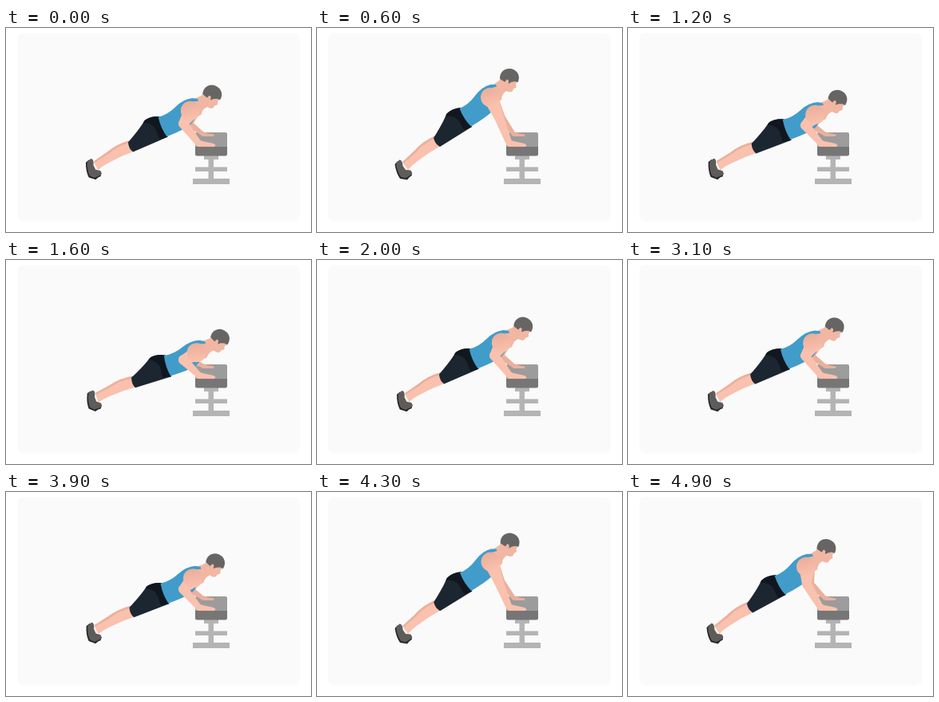
Animation, 382 px wide and 256 px high, one loop 5000 ms. Source, as an HTML page:

```html
<!DOCTYPE html>
<html lang="en">
<head>
<meta charset="utf-8">
<title>Incline push-up</title>
<style>
  html, body { margin: 0; width: 100%; height: 100%; overflow: hidden; background: #fff; }
  svg { display: block; width: 382px; height: 256px; }
  .skin { fill: #f9c1ae; }
  .face { fill: #f1b7a3; }
  .shade { fill: #eab09c; }
</style>
</head>
<body>
<svg viewBox="0 0 382 256">
  <defs>
    <linearGradient id="tone" x1=".2" y1="0" x2=".6" y2="1">
      <stop offset="0" stop-color="#e9ad99"/>
      <stop offset="1" stop-color="#f9c1ae"/>
    </linearGradient>
  </defs>

  <rect x="14" y="6.500" width="354" height="236" rx="8" fill="#fafafa"/>

  <g id="bench">
    <path fill="#b4b4b4" d="M248 160h18v5h-6v9.500h17v5.500h-17v9h20v7h-46v-7h19.500v-9H237v-5.500h16.500V165H248z"/>
    <path fill="#9c9c9c" d="M239 131h36q2 0 2 2v17h-40v-17q0-2 2-2z"/>
    <path fill="#777676" d="M237 149h40v9.500q0 2-2 2h-36q-2 0-2-2z"/>
  </g>

  <g class="shade">
    <path id="farUpper"/>
    <path id="farFore"/>
    <path d="M243 130.500Q248 129.500 252 132L260 133.500Q262 135 259 136L247 136Q243 135 243 130.500Z"/>
  </g>

  <g class="body">
    <g id="leg">
      <path class="shade" d="M148 135Q131 143 122 154L107 168L113 175L150 146Z"/>
      <path class="skin" d="M147 139Q133 145 124 156L108 170L114 178Q119 172 126 167Q140 156 155 148Z"/>
    </g>
    <g id="shoe">
      <path fill="#252525" d="M97.500 171L101 167L108 184L119 181L118.500 185.500L116 187L113 190.500L104 189Q99 182 97.500 171Z"/>
      <path fill="#5d5c5a" d="M99 170L103 165.500Q107 165 107.500 173L111 178L117 178.500Q120 181 118 184L111 188.500L105 187Q100 180 99 170Z"/>
    </g>
    <path fill="#1c2631" d="M180 100Q169 101 162 108Q159 117 146 138Q148 146 154 149L194 124Z"/>
    <path fill="#10171f" d="M180 100Q169 101 163 107L161 111Q172 109 178 117L184 128L194 124Z"/>
    <path class="face" d="M212 74Q225 70 230 64L240 78Q232 80 231 90L222 96Z"/>
    <g id="head" transform="rotate(15 241 62)">
      <path class="face" d="M231 63L249 60L252.500 63L251 68L252.500 72L250 74L249 78Q246 81 241 79L235 79Z"/>
      <path fill="#666564" d="M230 67C227 58 233 51 241 51C249 51 254 57 253 65L249 65L245 67L242 70L241 66L238.500 65L237 69Z"/>
    </g>
    <path fill="#429cc9" d="M178.500 101Q190 96 198 85Q206 74 217 71L224 71L225 73.500L216 76Q230 92 219 105Q212 112 193 123.500Q184 115 178.500 101Z"/>
  </g>

  <g id="nearArm">
    <path id="upper" class="skin"/>
    <path id="fore" class="skin"/>
    <circle class="body" cx="217" cy="87" r="12" fill="url(#tone)"/>
    <path class="skin" d="M236 141Q241 139 246 142L260 145Q264 147 261 149L241 149Q236 148 236 141Z"/>
  </g>
</svg>

<script>
  const LOOP = 5000, STEP = 100;
  // One push-up: a half sine down and up, then a rest at the top
  const PERIOD = 2000, MOVE = 1530, FIRST = 780, DEPTH = 14.7;
  const TOE = [114, 186];
  const el = id => document.getElementById(id);
  const bodyParts = document.querySelectorAll(".body");

  function leanAt(time) {
    const phase = (time - FIRST + PERIOD) % PERIOD;
    return phase < MOVE ? DEPTH * Math.sin(Math.PI * phase / MOVE) : 0;
  }

  function turn(x, y, degrees) {
    const a = degrees * Math.PI / 180, c = Math.cos(a), s = Math.sin(a);
    const dx = x - TOE[0], dy = y - TOE[1];
    return [TOE[0] + dx * c - dy * s, TOE[1] + dx * s + dy * c];
  }

  // Tapered limb with round caps of radius r0 and r1
  function limb([x0, y0], r0, [x1, y1], r1) {
    const len = Math.hypot(x1 - x0, y1 - y0);
    const nx = (y0 - y1) / len, ny = (x1 - x0) / len;
    return `M${x0 + nx * r0} ${y0 + ny * r0}L${x1 + nx * r1} ${y1 + ny * r1}` +
      `A${r1} ${r1} 0 0 0 ${x1 - nx * r1} ${y1 - ny * r1}` +
      `L${x0 - nx * r0} ${y0 - ny * r0}A${r0} ${r0} 0 0 0 ${x0 + nx * r0} ${y0 + ny * r0}Z`;
  }

  function pose(lean) {
    const bend = lean / 11;
    const elbow = [222 + 6 * Math.max(0, 1 - bend) ** 3, 112 + 10 * bend];
    const farElbow = [elbow[0] + 3 + 5 * bend, elbow[1]];
    for (const part of bodyParts) part.setAttribute("transform", `rotate(${lean} ${TOE})`);
    el("upper").setAttribute("d", limb(turn(218, 88, lean), 9.5, elbow, 6));
    el("fore").setAttribute("d", limb(elbow, 6, [240, 143], 4));
    el("farUpper").setAttribute("d", limb(turn(222, 90, lean), 6, farElbow, 4.5));
    el("farFore").setAttribute("d", limb(farElbow, 4.5, [246, 132.5], 2.5));
  }

  const start = performance.now();
  function draw() {
    const time = (performance.now() - start) % LOOP;
    pose(leanAt(Math.floor(time / STEP) * STEP));
    requestAnimationFrame(draw);
  }
  draw();
</script>
</body>
</html>
```
